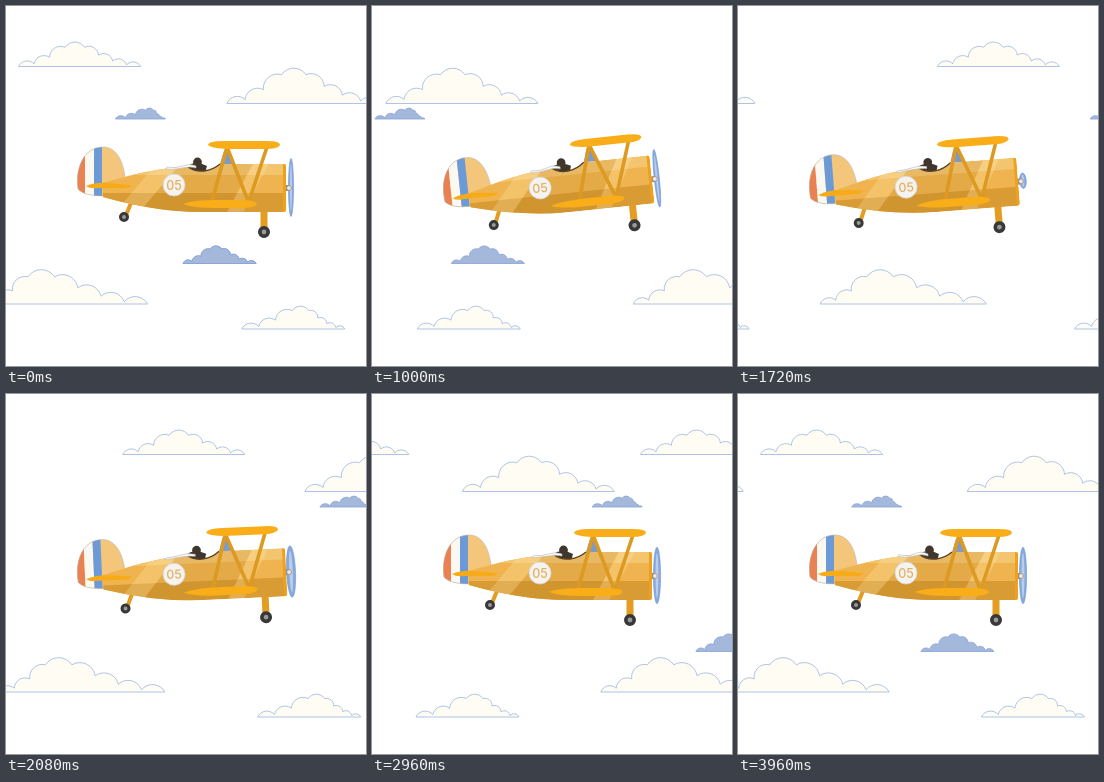
Animation of 360 by 360 pixels, one loop 4000 ms. Source, as an HTML page:

```html
<!DOCTYPE html>
<html lang="en">
<head>
<meta charset="utf-8">
<title>Biplane</title>
<style>
  html, body { margin: 0; width: 100%; height: 100%; overflow: hidden; background: #fff; }
  svg { display: block; width: 100%; height: 100%; }
  .roundel { font: 500 12.5px Inter, sans-serif; text-anchor: middle; fill: #dfb267; }
</style>
</head>
<body>
<svg viewBox="0 0 360 360">
  <defs>
    <clipPath id="finClip"><path id="fin" d="M72 183C69 162 78 141 97 141C110 141 117 154 119 171L108 191L97 190Q78 190 72 183Z"/></clipPath>
    <clipPath id="bodyClip"><path d="M96 177L122 170Q150 163 181 160Q188 166 198 165Q207 164 214 158H278Q280 158 280 161V203Q280 206 277 206H195Q150 206 97 191Z"/></clipPath>
  </defs>
  <g id="sky" stroke-width=".8" stroke-linejoin="round"></g>
  <g id="plane">
    <path d="M279 179H285V185H279Z" fill="#9a8f86"/>
    <g transform="translate(285 181.5)">
      <ellipse id="blades" fill="#87a9dc" stroke="#6f97d3" stroke-width=".6"/>
      <ellipse id="shine" fill="#bacdeb"/>
    </g>

    <g stroke="#e39d22" stroke-linecap="round">
      <path d="M125 197L120 209" stroke-width="4"/>
      <path d="M258 204V221" stroke-width="7"/>
    </g>
    <g fill="#999" stroke="#383838">
      <circle cx="118" cy="211" r="3.5" stroke-width="3"/>
      <circle cx="258" cy="226" r="4.2" stroke-width="3.6"/>
    </g>

    <g clip-path="url(#finClip)">
      <path d="M65 135H125V195H65Z" fill="#f3c67c"/>
      <path d="M65 135H79V195H65Z" fill="#e98153"/>
      <path d="M79 135H88V195H79Z" fill="#fbf8f2"/>
      <path d="M88 135H96V195H88Z" fill="#6c9ad6"/>
    </g>
    <use href="#fin" fill="none" stroke="#b9b6ac" stroke-width=".6"/>

    <path d="M214 158L218 145H224L227 158Z" fill="#7c9aca"/>
    <g fill="#40362c">
      <path d="M181 160Q190 154 201 160L199 167H187Z"/>
      <circle cx="191.5" cy="156" r="4.4"/>
    </g>

    <g clip-path="url(#bodyClip)">
      <path d="M90 150H285V210H90Z" fill="#efb44f"/>
      <path d="M90 150H285V169H90Z" fill="#f4c56f"/>
      <path d="M90 187H285V210H90Z" fill="#d99b33"/>
      <path d="M157 150H181L130 210H106ZM251 150H267L235 210H219Z" fill="#fff0c5" opacity=".22"/>
      <path d="M181 150H251L219 210H130Z" fill="#a87422" opacity=".16"/>
      <path d="M277 150H282V210H277Z" fill="#eda11c"/>
    </g>
    <path d="M181 160Q188 166 198 165Q207 164 214 158" fill="none" stroke="#5a4023" stroke-width="1.3"/>
    <path id="scarf" fill="#fffaf0" stroke="#b5bccb" stroke-width=".6"/>
    <path d="M80 180Q89 176 104 177L125 179Q125 181 121 182H92Q84 183 80 180Z" fill="#f8ab19"/>

    <circle cx="168" cy="179" r="11" fill="#f6f3ee" stroke="#d0d5de" stroke-width=".8"/>
    <text class="roundel" x="168" y="183.5">05</text>

    <path d="M221 141L206 195M221 141L242 195M261 141L243 195" fill="none" stroke="#dc9a22" stroke-width="3.6"/>
    <g fill="#f9ad19">
      <path d="M202 139Q203 135 218 135H260Q274 135 274 139Q272 143 260 143H220Q204 142 202 139Z"/>
      <path d="M177 198Q187 194 211 194H239Q251 195 251 198Q249 202 235 202H208Q187 202 177 198Z"/>
    </g>
    <circle cx="283" cy="182" r="2.4" fill="#efe9e0" stroke="#9b7f70" stroke-width=".7"/>
  </g>
</svg>
<script>
const LOOP = 4000;
const STAGE = 360;
const byId = id => document.getElementById(id);
const clouds = [];

const WHITE = { fill: '#fffcf3', stroke: '#9ab6e2' };
const BLUE = { fill: '#a4b8dc', stroke: '#87a3d5' };
const lowDrift = { y: 323, width: 103, height: 23, peak: 0.57, color: WHITE };
const highDrift = { y: 60.5, width: 122, height: 24, peak: 0.46, color: WHITE };
const tower = { y: 97.5, width: 152, height: 36, peak: 0.44, color: WHITE };
const bank = { y: 298, width: 166, height: 34, peak: 0.36, color: WHITE };
const highWisp = { y: 113, width: 50, height: 11, peak: 0.68, color: BLUE };
const lowWisp = { y: 257.5, width: 73, height: 18, peak: 0.45, color: BLUE };

// Round lumps step down from a central crown to both ends of a flat base.
function cloudPath({ width, height, peak }) {
  const crown = 0.08, leftLumps = 3, rightLumps = 4;
  const step = d => 0.8 * height * (1 - d) ** 1.8;
  const points = [];
  for (let i = leftLumps; i >= 0; i--) {
    const d = i / leftLumps;
    points.push([(peak - crown) * (1 - d) * width, step(d)]);
  }
  for (let i = 0; i <= rightLumps; i++) {
    const d = i / rightLumps, edge = peak + crown;
    points.push([(edge + (1 - edge) * d) * width, step(d)]);
  }
  const arcs = points.slice(1).map(([x, h], i) => {
    const r = 0.6 * Math.hypot(x - points[i][0], h - points[i][1]);
    return `A${r} ${r} 0 0 1 ${x} ${-h}`;
  });
  return `M0 0${arcs.join('')}Z`;
}

// A cloud reaches the right edge at `enter` ms and drifts left at `speed` px/ms.
// It shows only while its left end lies between `appear` and `vanish`.
function addCloud(shape, enter, speed, { appear = STAGE, vanish = -shape.width } = {}) {
  const el = document.createElementNS('http://www.w3.org/2000/svg', 'path');
  el.setAttribute('d', cloudPath(shape));
  el.setAttribute('fill', shape.color.fill);
  el.setAttribute('stroke', shape.color.stroke);
  byId('sky').append(el);
  clouds.push({ el, y: shape.y, enter, speed, appear, vanish });
}

addCloud(highDrift, 2589, 0.246);
addCloud(highDrift, 1021, 0.2295, { appear: 280 });
addCloud(tower, 3329, 0.207);
addCloud(tower, 1823, 0.237);
addCloud(highWisp, 1648, 0.1065);
addCloud(lowWisp, 2705, 0.141, { vanish: 177 });
addCloud(lowWisp, 2123, 0.0975, { appear: 177, vanish: 47 });
addCloud(bank, 2422, 0.2435);
addCloud(bank, 604, 0.2486);
addCloud(lowDrift, 3349, 0.1905, { appear: 330 });
addCloud(lowDrift, 1622, 0.236, { vanish: -70 });

const clamp = v => Math.min(1, Math.max(0, v));
const ease = v => (1 - Math.cos(Math.PI * clamp(v))) / 2;

function drawClouds(t) {
  for (const { el, y, enter, speed, appear, vanish } of clouds) {
    const x = STAGE - speed * ((t - enter + LOOP) % LOOP);
    el.setAttribute('transform', `translate(${x} ${y})`);
    el.setAttribute('visibility', x <= appear && x >= vanish ? 'visible' : 'hidden');
  }
}

function setRadii(id, rx, ry) {
  byId(id).setAttribute('rx', rx);
  byId(id).setAttribute('ry', ry);
}

function drawPlane(t) {
  const climb = ease(t / 900) - ease((t - 1100) / 1800);
  byId('plane').setAttribute('transform',
    `translate(${0.6 * climb} ${1.6 * climb}) rotate(${-6 * climb} 181 184)`);

  // The propeller is seen nearly edge-on, so its blades shorten as they turn.
  const spin = 8 * Math.PI * t / LOOP;
  const rx = 2.5 + 2.3 * Math.abs(Math.sin(2 * spin));
  const ry = 3 + 26 * Math.abs(Math.cos(spin));
  setRadii('blades', rx, ry);
  setRadii('shine', rx * 0.4, ry * 0.8);

  const wave = 1.2 * Math.sin(20 * Math.PI * t / LOOP);
  byId('scarf').setAttribute('d',
    `M190 160Q183 ${157 + wave} 176 160T161 ${161 + wave}L160 ${163 + wave}Q168 ${164 - wave} 176 162T190 162Z`);
}

function frame(now) {
  const t = now % LOOP;
  drawClouds(t);
  drawPlane(t);
  requestAnimationFrame(frame);
}
frame(performance.now());
</script>
</body>
</html>
```
